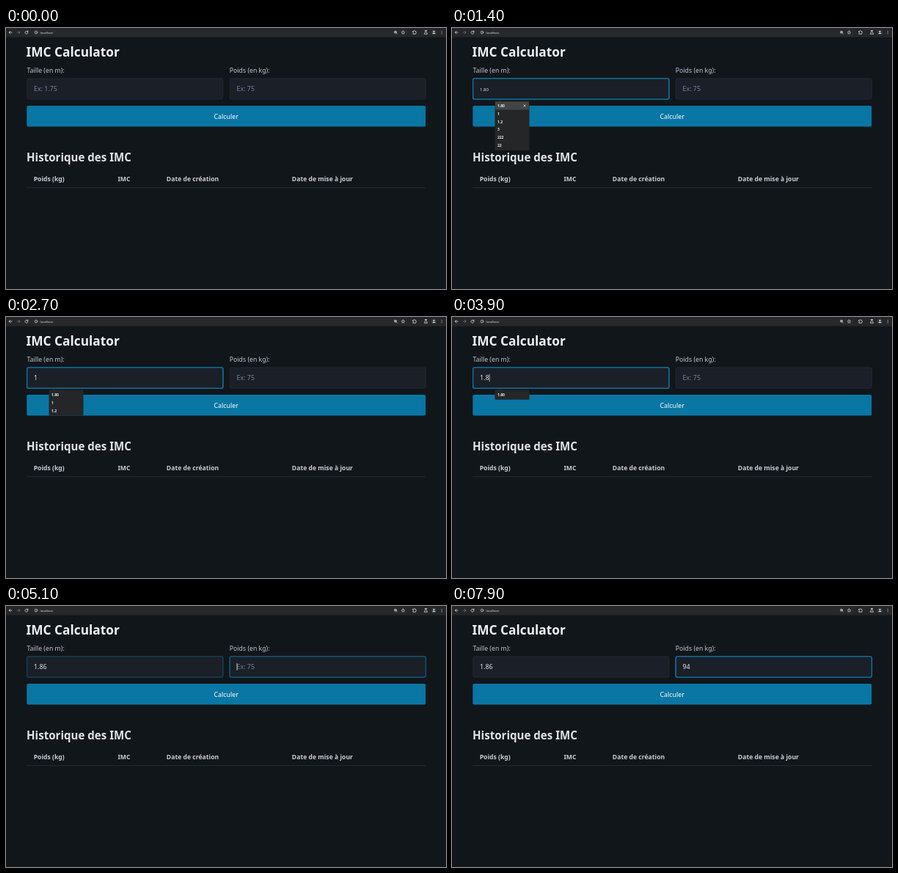
Write an HTML page that moves like this. It is 600x356 px and loops after 8 s.

```html
<!DOCTYPE html>
<html lang="fr">
<head>
<meta charset="utf-8">
<title>IMC Calculator</title>
<style>
html, body { margin: 0; width: 100%; height: 100%; overflow: hidden; background: #11161b; }
svg { display: block; width: 600px; height: 356px; }
text { font-family: "Noto Sans", "Open Sans", sans-serif; white-space: pre; }
.b { font-weight: 700; }
.icon { fill: none; stroke: #dfe1e3; stroke-width: .75; stroke-linecap: round; stroke-linejoin: round; }
.label { font-size: 8.72px; fill: #c2c7d0; }
.head { font-size: 8.65px; font-weight: 600; fill: #c9cdd4; }
.input { font-size: 8.9px; }
.item { font-size: 5px; font-weight: 600; fill: #eceded; }
</style>
</head>
<body>
<svg viewBox="0 0 600 356">
  <rect width="600" height="356" fill="#11161b"/>
  <rect width="600" height="12.6" fill="#252627"/>
  <rect x="35" y="1.4" width="513" height="9.6" rx="4.8" fill="#28292a"/>
  <g class="icon">
    <path d="M8 6H4.2M6 4.2 4.2 6 6 7.8"/>
    <path stroke="#77797b" d="M15.2 6H19M17.2 4.2 19 6 17.2 7.8"/>
    <path d="M29.7 5A2 2 0 1 0 30 6.6M30 3.9V5.3H28.6"/>
    <circle cx="41" cy="6" r="1.9" stroke-width=".55"/>
    <path stroke-width=".55" d="M41 5.9V7M41 4.9V5"/>
    <circle cx="531" cy="5.6" r="1.5"/>
    <path d="M532.2 6.8 533.4 8M530.4 5.6H531.6"/>
    <path stroke-width=".6" d="M541.5 3.8 542.2 5.3 543.8 5.5 542.6 6.6 542.9 8.2 541.5 7.4 540.1 8.2 540.4 6.6 539.2 5.5 540.8 5.3Z"/>
    <path d="M554.9 4.4H556.1A.8 .8 0 0 1 557.7 4.4H558.7V5.4A.8 .8 0 0 1 558.7 7V8.2H554.9V7A.8 .8 0 0 0 554.9 5.4Z"/>
    <path d="M571.3 3.5H573.7M571.9 3.5V5.3L570.3 8.2H574.7L573.1 5.3V3.5"/>
  </g>
  <circle cx="583.5" cy="6" r="3.6" fill="#35383b"/>
  <g fill="#dfe1e3">
    <circle cx="583.5" cy="4.8" r="1.1"/>
    <path d="M581.3 8.1Q581.5 6.4 583.5 6.4T585.7 8.1Z"/>
    <circle cx="594.2" cy="4.2" r=".5"/>
    <circle cx="594.2" cy="6" r=".5"/>
    <circle cx="594.2" cy="7.8" r=".5"/>
    <text x="46.6" y="7.6" font-size="4.15">localhost</text>
  </g>

  <text class="b" x="27.6" y="39.2" font-size="17.3" fill="#f0f1f3">IMC Calculator</text>
  <text class="label" x="28.4" y="61.4">Taille (en m):</text>
  <text class="label" x="304.8" y="61.4">Poids (en kg):</text>
  <g id="fields"></g>
  <rect x="28.3" y="106" width="543.9" height="28.5" rx="2" fill="#0976a3"/>
  <text x="300.2" y="123.5" font-size="8.85" text-anchor="middle" fill="#fff">Calculer</text>

  <text class="b" x="28" y="182" font-size="15.1" fill="#e0e3e7">Historique des IMC</text>
  <text class="head" x="37.7" y="209">Poids (kg)</text>
  <text class="head" x="152.4" y="209">IMC</text>
  <text class="head" x="218.8" y="209">Date de création</text>
  <text class="head" x="389.8" y="209">Date de mise à jour</text>
  <rect x="28.3" y="217.2" width="543.9" height="1.1" fill="#252b32"/>

  <g id="menu">
    <path id="panel" fill="#252627"/>
    <g id="hover">
      <rect x="59" y="100.6" width="46" height="10.9" fill="#434446"/>
      <path class="icon" stroke-width=".65" d="M97.8 104.8 100.2 107.2M100.2 104.8 97.8 107.2"/>
    </g>
    <g id="items"></g>
  </g>
</svg>
<script>
const LOOP = 8000, PITCH = 10.85;
const HISTORY = ['1.80', '1', '1.2', '3', '222', '22'];
const $ = id => document.getElementById(id);
const clamp = v => Math.max(0, Math.min(1, v));
const ramp = (t, from, to) => { const p = clamp((t - from) / (to - from)); return 1 - (1 - p) ** 2; };
const within = (t, ...spans) => spans.some(([a, b]) => t >= a && t < b);
const mix = (a, b, p) => `rgb(${a.map((v, i) => Math.round(v + (b[i] - v) * p))})`;

// last value whose start time has passed
const at = (t, steps) => steps.reduce((value, [start, next]) => t >= start ? next : value, '');

function add(parent, tag, attrs) {
  const el = document.createElementNS('http://www.w3.org/2000/svg', tag);
  for (const k in attrs) el.setAttribute(k, attrs[k]);
  return parent.appendChild(el);
}

function makeField(x, hint) {
  const g = $('fields');
  const box = { x: x + .5, y: 69, width: 267, height: 28, rx: 2 };
  const glow = add(g, 'rect', { ...box, fill: 'none', stroke: '#0f86b5', 'stroke-width': 1.7 });
  const rect = add(g, 'rect', { ...box, fill: '#1a1f28', 'stroke-width': .9 });
  const text = add(g, 'text', { class: 'input', x: x + 9.7, y: 86.3 });
  const caret = add(g, 'rect', { y: 78, width: .8, height: 10, fill: '#d5d9df' });
  return (value, focus, blink, preview) => {
    glow.setAttribute('opacity', focus * .8);
    rect.setAttribute('stroke', mix([37, 43, 54], [15, 134, 181], focus));
    text.textContent = preview || value || hint;
    text.setAttribute('fill', preview || value ? '#e0e3e7' : '#7b8495');
    text.style.fontSize = preview ? '6px' : '';
    const dots = value.includes('.') ? 1 : 0;
    caret.setAttribute('x', x + 9.8 + (value.length - dots) * 5.09 + dots * 2.39);
    caret.setAttribute('visibility', blink ? 'visible' : 'hidden');
  };
}

const height = makeField(28.3, 'Ex: 1.75');
const weight = makeField(304.8, 'Ex: 75');
const rows = HISTORY.map((_, i) => add($('items'), 'text', { class: 'item', x: 61.9, y: 107.9 + i * PITCH }));

function drawMenu(t, value) {
  const found = HISTORY.filter(s => s.startsWith(t < 4500 ? value : '1.8'));
  rows.forEach((row, i) => row.textContent = found[i] || '');
  const bottom = 102 + found.length * PITCH;
  $('panel').setAttribute('d',
    `M60 99.2H63L65 97.6 67 99.2H104Q105.5 99.2 105.5 100.7V${bottom - 1.5}q0 1.5-1.5 1.5H60` +
    `q-1.5 0-1.5-1.5V100.7Q58.5 99.2 60 99.2Z`);
  $('menu').setAttribute('opacity', ramp(t, 900, 1100) * (1 - ramp(t, 4500, 4800)));
  $('hover').setAttribute('opacity', within(t, [1400, 1600]) ? 1 : 0);
}

function draw(t) {
  const size = at(t, [[2100, '1'], [3100, '1.'], [3700, '1.8'], [4500, '1.86']]);
  const mass = at(t, [[6800, '9'], [7300, '94']]);
  const blur = ramp(t, 5000, 5250);
  height(size, ramp(t, 700, 900) * (1 - blur),
    within(t, [700, 1400], [1800, 2700], [3100, 4400], [4500, 5000]),
    within(t, [1400, 1600]) ? HISTORY[0] : '');
  weight(mass, blur, within(t, [5000, 5600], [6200, 7900]));
  drawMenu(t, size);
}

function frame() {
  draw(performance.now() % LOOP);
  requestAnimationFrame(frame);
}
frame();
</script>
</body>
</html>
```
